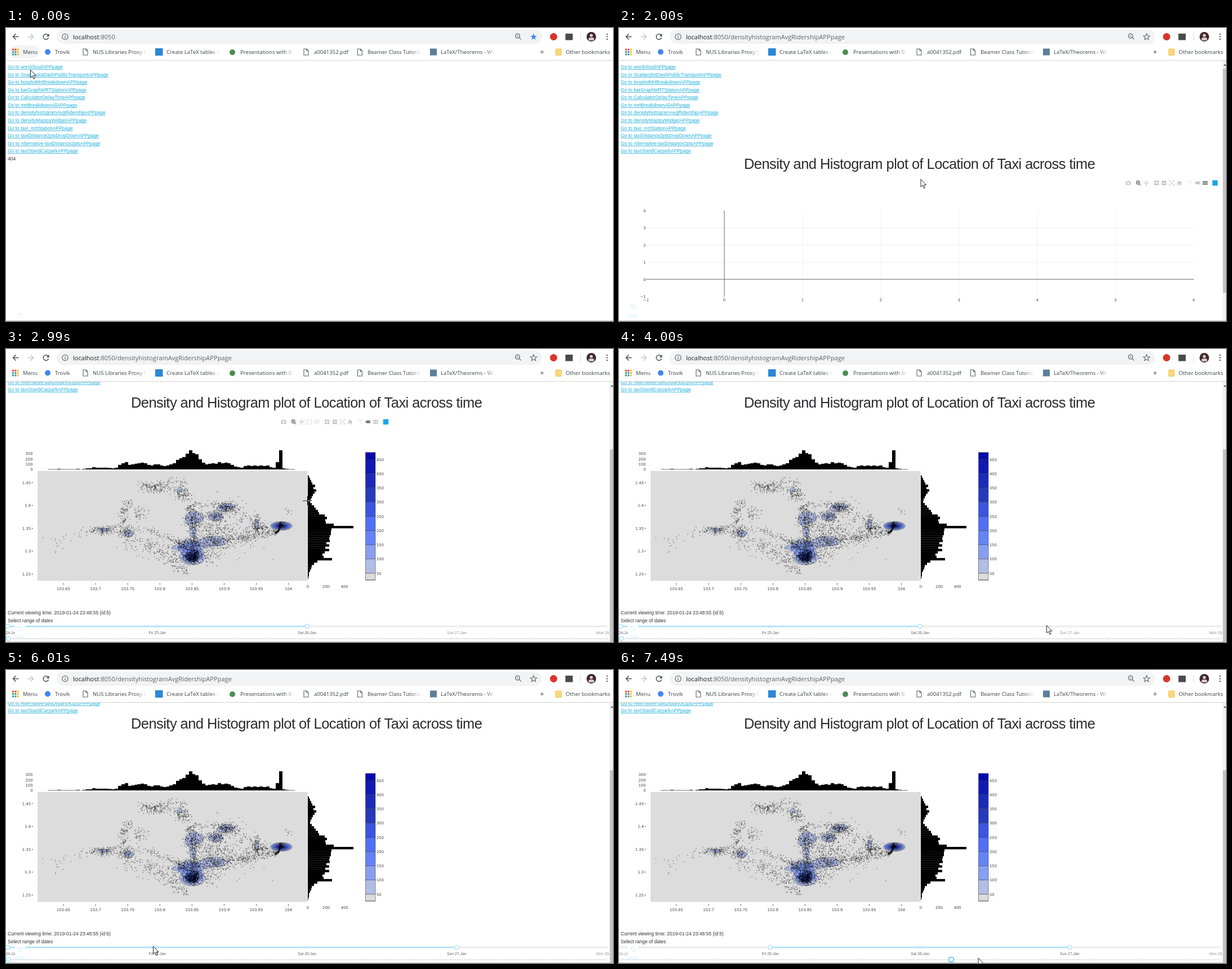
Animation, 1078 px wide and 520 px high, one loop 7990 ms. Source, as an HTML page with a canvas:

```html
<!DOCTYPE html>
<html lang="en">
<head>
<meta charset="utf-8">
<title>Taxi density dashboard</title>
<style>
html, body { margin: 0; width: 100%; height: 100%; overflow: hidden; background: #fff; }
canvas { display: block; width: 1078px; height: 520px; }
</style>
</head>
<body>
<canvas id="stage" width="1078" height="520"></canvas>
<script>
const ctx = document.getElementById('stage').getContext('2d');
const LOOP = 7990;
const UI = '"Open Sans", sans-serif';
const ARIAL = '"Liberation Sans", Arial, sans-serif';
const PLOT = '"DejaVu Sans", Verdana, sans-serif';

// start time, cursor kind, cursor x, cursor y, page changes
const steps = [
  [0, 'arrow', 43.5, 74.5, { page: 'home', menuLit: true }],
  [500, 'hand', 97, 134, { menuLit: false }],
  [990, 'hand', 19, 146, {}],
  [2000, 'arrow', 536, 268.5, { page: 'empty', scroll: 0, thumb: [72, 470] }],
  [2500, 'resize', 536, 269, { page: 'plot', scroll: 85, thumb: [133, 477] }],
  [2990, 'cross', 535, 269, { scroll: 146, thumb: [178, 520] }],
  [3490, 'arrow', 617, 493.5, { bar: false }],
  [4000, 'arrow', 759.5, 490.5, {}],
  [4490, 'arrow', 807.5, 490.5, { to: 3 }],
  [4990, 'arrow', 369.5, 490, { gap: 42.56 }],
  [5510, 'arrow', 264.5, 495, {}],
  [6010, 'arrow', 261.5, 490.5, {}],
  [6490, 'arrow', 264.5, 492.5, { from: 1 }],
  [6990, 'arrow', 598, 509, { gap: 83.7 }],
  [7490, 'arrow', 638, 511, { value: 7 }]
];
const initial = { scroll: 0, bar: true, from: 0, to: 2, gap: 66.5, value: 0 };

const links = ['wordcloud', 'ScatterplotDashPublicTransport', 'boxplotMrtBreakdown', 'barGraphMRTStation',
  'CalculatorDelayTime', 'mrtBreakdownAll', 'densityhistogramAvgRidership', 'densityMapIpyWidget',
  'taxi_mrtStation', 'taxiDistance2ptsDropDown', 'Alternative-taxiDistance2pts', 'taxiStandCarpark'];

function text(s, x, y, size, font, color, align = 'left') {
  ctx.font = `${size}px ${font}`;
  ctx.textAlign = align;
  ctx.fillStyle = color;
  ctx.fillText(s, x, y);
}
function rect(x, y, w, h, color) {
  ctx.fillStyle = color;
  ctx.fillRect(x, y, w, h);
}
function disc(x, y, r, fill, stroke, width = 1) {
  ctx.beginPath();
  ctx.arc(x, y, r, 0, 7);
  paint(fill, stroke, width);
}
function pill(x, y, w, h, r, fill, stroke, width = 1) {
  ctx.beginPath();
  ctx.roundRect(x, y, w, h, r);
  paint(fill, stroke, width);
}
function paint(fill, stroke, width = 1) {
  if (fill) { ctx.fillStyle = fill; ctx.fill(); }
  if (stroke) { ctx.strokeStyle = stroke; ctx.lineWidth = width; ctx.stroke(); }
}
// path in local coordinates around x, y
function shape(d, x, y, fill, stroke, width = 1) {
  ctx.save();
  ctx.translate(x, y);
  const path = new Path2D(d);
  if (fill) { ctx.fillStyle = fill; ctx.fill(path); }
  if (stroke) { ctx.strokeStyle = stroke; ctx.lineWidth = width; ctx.stroke(path); }
  ctx.restore();
}

/* ---------- browser frame ---------- */
function bookmark(label, x, width = 95) {
  const fade = ctx.createLinearGradient(x, 0, x + width, 0);
  fade.addColorStop(0.82, '#3c4043');
  fade.addColorStop(1, 'rgba(60,64,67,0)');
  text(label, x, 46, 9.6, UI, fade);
}
function browser(s) {
  rect(0, 0, 1078, 57, '#fff');
  rect(0, 57, 1078, 1, '#d2d2d2');
  const dark = '#5f6368';
  shape('M5.5 0H-4.5M.5 -5L-4.5 0L.5 5', 17, 15.5, null, '#4d5156', 1.5);
  shape('M-5.5 0H4.5M-.5 -5L4.5 0L-.5 5', 44, 15.5, null, '#c4c6c8', 1.5);
  shape('M4.2 -2.4A4.8 4.8 0 1 0 4.6 1.6', 71, 15.5, null, '#4d5156', 1.5);
  shape('M5.6 -5.6V-.6H.6Z', 71, 15.5, '#4d5156');

  pill(90, 3, 862, 25, 12.5, '#f1f3f4');
  disc(105, 15.5, 5.2, null, dark, 1.1);
  rect(104.4, 14.6, 1.2, 4, dark);
  rect(104.4, 12.2, 1.2, 1.3, dark);
  text('localhost', 119, 19.5, 11.1, UI, '#202124');
  const tail = s.page === 'home' ? ':8050' : ':8050/densityhistogramAvgRidershipAPPpage';
  text(tail, 119 + ctx.measureText('localhost').width, 19.5, 11.1, UI, dark);
  disc(908.5, 14, 3.8, null, dark, 1.3);
  shape('M2.6 2.6L6.3 6.3M-1.7 0H1.7', 908.5, 14, null, dark, 1.2);
  let star = '';
  for (let i = 0; i < 10; i++) {
    const r = i % 2 ? 2.6 : 6, a = i * Math.PI / 5;
    star += (i ? 'L' : 'M') + (r * Math.sin(a)).toFixed(2) + ' ' + (-r * Math.cos(a)).toFixed(2);
  }
  if (s.page === 'home') shape(star + 'Z', 937, 15.8, '#4285f4');
  else shape(star + 'Z', 937, 15.8, null, dark, 1.1);
  disc(972.5, 15.5, 6.5, '#d9362b');
  rect(993.5, 10, 13, 11.5, '#4a4a4a');
  rect(1020, 8, 1, 15, '#dadce0');
  disc(1039.5, 15.5, 8.5, '#40282c');
  ctx.save();
  ctx.beginPath();
  ctx.arc(1039.5, 15.5, 8.5, 0, 7);
  ctx.clip();
  disc(1039.5, 13.2, 2.7, '#d8cccb');
  pill(1034.5, 17, 10, 5, 2.5, '#d8cccb');
  ctx.restore();
  for (const y of [11, 15.5, 20]) disc(1067.5, y, 1.3, dark);

  if (s.menuLit) pill(6, 31, 52, 23, 11.5, '#f1f3f4');
  const dots = ['#ea4335', '#ea4335', '#fbbc05', '#34a853', '#4285f4', '#fbbc05', '#34a853', '#4285f4', '#fbbc05'];
  dots.forEach((c, i) => rect(11 + i % 3 * 4.3, 36.8 + Math.floor(i / 3) * 4.3, 3, 3, c));
  text('Menu', 30, 46, 9.6, UI, '#3c4043');
  disc(74, 42.5, 5, '#4285f4');
  text('Trovik', 87, 46, 9.6, UI, '#3c4043');
  for (const x of [141, 533, 628.5]) {
    shape('M-4 -5.5H1L4 -2.5V5.5H-4ZM1 -5.5V-2.5H4', x, 42.5, '#fff', dark, 1.1);
  }
  bookmark('NUS Libraries Proxy Bo', 154);
  rect(265, 36, 13.5, 13, '#2a86d8');
  bookmark('Create LaTeX tables onl', 285);
  disc(402, 43, 5, '#4b8d54');
  bookmark('Presentations with Bea', 416);
  text('a0041352.pdf', 547, 46, 9.6, UI, '#3c4043');
  bookmark('Beamer Class Tutorial', 642);
  rect(753, 36.5, 12, 12, '#5b7f99');
  bookmark('LaTeX/Theorems - Wi', 772, 97);
  text('»', 949, 46, 12, UI, '#3c4043');
  pill(976, 37, 10.5, 11.5, 1, '#fbd878', '#e9c15c', 0.8);
  text('Other bookmarks', 994, 46, 9.6, UI, '#3c4043');
}

/* ---------- chart toolbar ---------- */
const icons = {
  camera: 'M-4.5 -2.6H-2L-1 -4H1L2 -2.6H4.5V3.6H-4.5ZM2 .4A2 2 0 1 0 -2 .4A2 2 0 1 0 2 .4Z',
  plus: 'M-4 -4H4V4H-4ZM-.7 -2.6V-.7H-2.6V.7H-.7V2.6H.7V.7H2.6V-.7H.7V-2.6Z',
  minus: 'M-4 -4H4V4H-4ZM-2.6 -.7V.7H2.6V-.7Z',
  home: 'M0 -4L4.5 .2H3.2V4H.9V1.2H-.9V4H-3.2V.2H-4.5Z',
  closest: 'M-4.5 0L-2 -2.5H4.5V2.5H-2Z',
  compare: 'M-4.5 -3.2H4.5V-.6H-4.5ZM-4.5 .6H4.5V3.2H-4.5Z'
};
const lineIcons = {
  pan: 'M-4.3 0H4.3M0 -4.3V4.3M-1.3 -3L0 -4.4L1.3 -3M-1.3 3L0 4.4L1.3 3M-3 -1.3L-4.4 0L-3 1.3M3 -1.3L4.4 0L3 1.3',
  zoom: 'M1.1 1.1L4.2 4.2M2.2 -.8A3 3 0 1 0 -3.8 -.8A3 3 0 1 0 2.2 -.8M-2.2 -.8H.6M-.8 -2.2V.6',
  lasso: 'M-3 2.4C-6 -1 -1 -4.5 2.5 -3S4 2.5 -2 2.2M-2 2.2L-3.2 4',
  auto: 'M-2.6 -2.6L2.6 2.6M2.6 -2.6L-2.6 2.6M-4.3 -2V-4.3H-2M2 -4.3H4.3V-2M4.3 2V4.3H2M-2 4.3H-4.3V2',
  spike: 'M-3.5 -2.8H-1.5M-.3 -2.8H1.2M2.8 -4V-1.5M2.8 0V1M2.8 2V3'
};
function toolbar(y, names, xs, active) {
  names.split(' ').forEach((name, i) => {
    const color = active.includes(name) ? '#7c7c7c' : '#c7c7c7';
    if (name === 'logo') rect(xs[i] - 4.7, y - 4.7, 9.4, 9.4, '#1aa5e8');
    else if (name === 'select') {
      ctx.setLineDash([1.5, 1]);
      shape('M-4 -4H4V4H-4Z', xs[i], y, null, color, 1);
      ctx.setLineDash([]);
    } else if (icons[name]) {
      ctx.save();
      ctx.translate(xs[i], y);
      ctx.fillStyle = color;
      ctx.fill(new Path2D(icons[name]), 'evenodd');
      ctx.restore();
    } else shape(lineIcons[name], xs[i], y, null, color, name === 'zoom' ? 1.4 : 1);
  });
}

/* ---------- empty chart ---------- */
function emptyChart() {
  toolbar(275, 'camera zoom pan plus minus auto home spike closest compare logo',
    [904.5, 922.5, 936.5, 954.5, 968, 981.5, 995.5, 1012.5, 1027, 1041, 1058.5], ['zoom', 'compare']);
  for (let i = 1; i < 6; i++) rect(187 + 139 * i - 0.5, 324, 1, 153, '#f1f1f1');
  for (let i = 1; i < 4; i++) rect(48, 446 - 30.5 * i, 973, 1, '#f1f1f1');
  rect(48, 445.6, 973, 0.9, '#555');
  rect(186.6, 324, 0.9, 153, '#555');
  const label = n => String(n).replace('-', '−');
  for (let n = -1; n < 5; n++) text(label(n), 47.5, 448.5 - 30.5 * n, 6.8, PLOT, '#444', 'right');
  for (let n = -1; n < 7; n++) text(label(n), 187 + 139 * n, 484.5, 6.8, PLOT, '#444', 'center');
}

/* ---------- density chart, laid out for a scroll of 85 ---------- */
const topBars = [.5, .5, .5, 1, .5, .5, .5, .5, .5, 1, .2, 1, 2, 2, 4, 3, 3, 3, 3, 2.5, 2, 3, 8, 11, 13, 8, 9, 10, 11, 12,
  11, 8, 7, 9, 9, 7, 6, 7, 9, 11, 17, 20, 22, 28, 34, 29, 27, 18, 12, 9, 10, 11, 10, 13, 11, 12, 11, 8, 5, 4, 3, 6, 7, 6,
  7, 6, 7, 6, 7, 4, 3, 13, 34, 2, 1, .5, .5];
const sideBars = [2, 4, 6, 8, 13, 10, 15, 12, 9, 7, 5, 4, 7, 11, 14, 18, 20, 30, 34, 31, 32, 46, 81, 42, 41, 41, 39, 38,
  39, 33, 38, 31, 38, 30, 26, 28, 43, 17, 11, 7, 6, 4, 2, 2, 1];

const ramp = [[0, 220, 220, 220], [.3, 106, 137, 247], [.4, 90, 120, 245], [.5, 70, 100, 245], [.65, 40, 60, 190], [1, 5, 10, 172]];
function levelColor(level) {
  const v = level / 9;
  const i = Math.max(1, ramp.findIndex(stop => stop[0] >= v));
  const a = ramp[i - 1], b = ramp[i], k = (v - a[0]) / (b[0] - a[0]);
  return `rgb(${[1, 2, 3].map(c => Math.round(a[c] + (b[c] - a[c]) * k))})`;
}

let seed = 20190124;
function random() {
  seed = (Math.imul(seed, 1664525) + 1013904223) >>> 0;
  return seed / 4294967296;
}
const normal = () => (random() + random() + random() + random() - 2) * 1.73;
const points = [];
function cluster(x, y, sx, sy, n) {
  while (n--) points.push([x + normal() * sx, y + normal() * sy]);
}
function trail(n, spread, ...p) {
  for (let i = 0; i < n; i++) {
    const u = random() * (p.length / 2 - 1), k = Math.floor(u) * 2, f = u % 1;
    points.push([p[k] + (p[k + 2] - p[k]) * f + normal() * spread, p[k + 1] + (p[k + 3] - p[k + 1]) * f + normal() * spread]);
  }
}
cluster(267, 307, 15, 5, 140);
cluster(314, 316, 7, 7, 120);
trail(60, 2.5, 236, 302, 265, 304, 296, 292, 322, 298);
trail(70, 4, 219, 330, 212, 345, 203, 357);
cluster(237, 353, 7, 6, 50);
cluster(170, 383, 13, 3.5, 130);
trail(24, 8, 78, 415, 100, 392, 145, 390);
cluster(214, 387, 7, 6, 130);
trail(50, 2, 170, 383, 205, 372, 214, 360);
trail(110, 3, 225, 378, 262, 385, 300, 400, 320, 410);
trail(130, 6, 208, 402, 250, 418, 290, 428, 320, 437);
trail(60, 4, 285, 436, 308, 450, 322, 460);
trail(70, 6, 235, 400, 265, 412, 300, 415);
cluster(333, 362, 8, 8, 220);
cluster(372, 358, 9, 5, 150);
cluster(390, 342, 10, 4, 190);
cluster(333, 387, 4, 13, 140);
cluster(370, 382, 20, 9, 160);
trail(90, 3, 322, 345, 340, 336, 400, 336);
trail(60, 5, 397, 342, 420, 356, 450, 370);
trail(130, 3, 380, 403, 420, 394, 465, 388, 481, 386);
trail(90, 5, 385, 410, 415, 398, 440, 378, 470, 374);
cluster(445, 374, 4, 11, 90);
cluster(457, 381, 9, 7, 60);
cluster(430, 396, 15, 6, 60);
cluster(369, 404, 12, 6, 240);
cluster(326, 408, 13, 5, 240);
cluster(331, 430, 8, 6, 480);
cluster(350, 425, 16, 9, 120);
trail(120, 1.5, 303, 412, 340, 420, 333, 436);
trail(110, .8, 479, 388, 485, 382, 488, 370);
cluster(488, 374, 2.5, 2.5, 70);
cluster(498, 350, 6, 3, 9);
cluster(390, 378, 36, 25, 140);

// closed curve through the midpoints of a coarse outline
function blob(level, ...p) {
  const n = p.length / 2, at = i => [p[i % n * 2], p[i % n * 2 + 1]];
  ctx.beginPath();
  for (let i = 0; i <= n; i++) {
    const [x, y] = at(i), [nx, ny] = at(i + 1);
    if (i) ctx.quadraticCurveTo(x, y, (x + nx) / 2, (y + ny) / 2);
    else ctx.moveTo((x + nx) / 2, (y + ny) / 2);
  }
  paint(levelColor(level), '#555', 0.5);
}
function oval(level, x, y, rx, ry, tilt = 0) {
  ctx.beginPath();
  ctx.ellipse(x, y, rx, ry, tilt, 0, 7);
  paint(levelColor(level), '#555', 0.5);
}
function contours() {
  blob(1, 317, 362, 323, 351, 336, 347, 353, 357, 349, 367, 337, 370, 330, 376, 320, 373);
  oval(1, 372, 358.5, 13, 7.5);
  oval(1, 390, 342, 16, 6.5, -.15);
  oval(1, 332, 386, 5.5, 10);
  oval(1, 218, 388, 9, 6);
  oval(1, 445, 373, 3.5, 10);
  oval(1, 309, 311, 5, 4);
  oval(1, 172, 382, 11, 3);
  blob(1, 288, 415, 310, 405, 324, 396, 338, 403, 353, 396, 374, 392, 392, 399, 389, 409, 372, 411, 353, 412, 347, 421,
    357, 430, 348, 440, 331, 445, 314, 441, 307, 428, 313, 419);
  blob(2, 300, 413, 325, 404, 345, 403, 345, 418, 351, 430, 334, 441, 315, 438, 314, 422);
  oval(3, 331, 427, 13, 11);
  oval(4, 330, 429, 10, 8);
  oval(5, 330, 430, 6.5, 5.5);
  for (let i = 1; i <= 9; i++) oval(i, 489, 375, 21.5 - i * 1.9, 8.6 - i * .75);
}
function densityChart(showBar) {
  if (showBar) toolbar(190.3, 'camera zoom pan select lasso plus minus auto home spike closest compare logo',
    [493, 511, 525, 538.5, 552, 570, 584, 597.5, 611, 628, 642.5, 656.5, 674.5], ['zoom', 'closest']);
  rect(56, 277.5, 479.5, 195, '#dcdcdc');
  contours();
  ctx.fillStyle = 'rgba(0,0,0,.42)';
  for (const [x, y] of points) ctx.fillRect(x - .75, y - .75, 1.5, 1.5);
  topBars.forEach((h, i) => rect(Math.round(73.5 + i * 5.71), 274.7 - h, 6, h, '#000'));
  sideBars.forEach((w, i) => rect(536, 285.4 + i * 4.07, w, 4.3, '#000'));

  const label = (s, x, y, align) => text(s, x, y + 2.5, 6.8, PLOT, '#444', align);
  for (let i = 0; i < 4; i++) label(i * 100, 47.5, 274.8 - i * 9.35, 'right');
  for (let i = 0; i < 5; i++) {
    const y = 298 + i * 40.6;
    label(String(+(1.45 - i * .05).toFixed(2)), 44, y, 'right');
    rect(45.5, y - .5, 2.5, 1, '#555');
  }
  for (let i = 0; i < 8; i++) {
    const x = 102 + i * 57.1;
    label(String(+(103.65 + i * .05).toFixed(2)), x, 486, 'center');
    rect(x - .5, 476.5, 1, 3, '#555');
  }
  for (let i = 0; i < 3; i++) label(i * 200, 536 + i * 32.6, 482, 'center');
  for (let i = 0; i < 10; i++) {
    const top = i === 9 ? 244.7 : 459 - i * 25.25, bottom = i ? 459 - (i - 1) * 25.25 : 471;
    rect(638.5, top, 17.5, bottom - top, levelColor(i));
    rect(638.5, bottom - .3, 17.5, .6, '#333');
    if (i) label(i * 50, 658, bottom);
  }
  ctx.strokeStyle = '#444';
  ctx.lineWidth = .6;
  ctx.strokeRect(638.5, 244.7, 17.5, 226.3);
}

/* ---------- sliders ---------- */
const BLUE = '#96dbfa', RAIL = '#e9e9e9', INK = '#323232';
function dot(x, y, color) { disc(x, y, 1.9, '#fff', color, 1.1); }
function sliders(s) {
  text('Current viewing time: 2019-01-24 23:48:55 (id:5)', 3, 471, 8.5, ARIAL, INK);
  text('Select range of dates', 3, 484.5, 8.5, ARIAL, INK);
  const at = i => 3 + i * 265.8;
  pill(0, 491, 1069, 2.4, 1.2, RAIL);
  rect(at(s.from), 491, at(s.to) - at(s.from), 2.4, '#abe2fb');
  ['Thu 24-Jan', 'Fri 25-Jan', 'Sat 26-Jan', 'Sun 27-Jan', 'Mon 28-Jan'].forEach((day, i) => {
    const on = i >= s.from && i <= s.to;
    dot(at(i), 492.2, on ? BLUE : RAIL);
    text(day, at(i), 506, 6.8, ARIAL, on ? '#666' : '#999', 'center');
  });
  for (const i of [s.from, s.to]) disc(at(i), 492.2, 3.7, '#fff', BLUE, 1.2);
  rect(15.5, 488, 18.5, 22, '#fff');

  pill(2, 513, 1066, 2.2, 1.1, RAIL);
  for (let x = 4; x < 1040; x += s.gap) dot(x, 514, RAIL);
  dot(1067, 514, RAIL);
  if (s.value) pill(586, 509.8, 8, 8, 2, '#fff', '#6fc6f5', 1.8);
  else disc(4.3, 514, 3.7, '#fff', BLUE, 1.2);
}

/* ---------- page ---------- */
function undo(home) {
  const y = home ? 509.5 : 495.5, color = home ? '#e0ecec' : '#d2effb';
  shape('M-3 -1.5A3.4 3.4 0 1 1 -1.5 3.2M-3.6 -3.8V-1H-.8', 25, y, null, color, 1.1);
  if (!home) text('undo', 25, 513.5, 8.5, ARIAL, color, 'center');
}
function page(s) {
  ctx.save();
  ctx.translate(0, -s.scroll);
  links.forEach((name, i) => {
    const label = `Go to ${name}APPpage`, y = 72 + i * 13.58;
    text(label, 3, y, 8.5, ARIAL, '#1eaedb');
    rect(3, Math.round(y + 1), ctx.measureText(label).width, .8, '#1eaedb');
  });
  if (s.page === 'home') text('404', 3, 235, 8.5, ARIAL, INK);
  else {
    ctx.letterSpacing = '-0.567px';
    text('Density and Histogram plot of Location of Taxi across time', 222, 249.5, 25.5, ARIAL, '#2b2b30');
    ctx.letterSpacing = '0px';
  }
  if (s.page === 'empty') emptyChart();
  if (s.page === 'plot') {
    ctx.translate(0, 85);
    densityChart(s.bar);
  }
  ctx.restore();
  if (s.scroll > 100) sliders(s);
  undo(s.page === 'home');
  if (s.thumb) {
    rect(1072, 58, 6, 462, '#f1f1f1');
    rect(1072.5, s.thumb[0], 5.5, s.thumb[1] - s.thumb[0], '#c1c1c1');
    shape('M-2.5 1.5L0 -1.5L2.5 1.5Z', 1076, 65.5, '#505050');
  }
  rect(0, 519, 1078, 1, '#c9c9c9');
}

/* ---------- pointer ---------- */
function pointer(kind, x, y) {
  if (kind === 'arrow') shape('M0 0V13.5L3.2 10.6L5.4 16L7.6 15L5.4 9.9H9.6Z', x, y, '#fff', '#111', .9);
  if (kind === 'hand') {
    shape('M5 1.5Q6.5 0 7.8 1.5V8Q9.5 7 10.6 8.4Q12.4 7.6 13.3 9.2Q15.6 8.6 16 10.6V15Q16 18 14 21.5H6.5Q5 18 1 13Q.8 10.6 3 11.4L5 13.5Z',
      x, y, '#fff', '#111', 1);
  }
  if (kind === 'resize') {
    const d = 'M-5 -5L5 5M-6.5 -2V-6.5H-2M6.5 2V6.5H2';
    shape(d, x, y, null, '#222', 3);
    shape(d, x, y, null, '#fff', 1.3);
  }
  if (kind === 'cross') {
    ctx.globalCompositeOperation = 'difference';
    rect(x - 8, y, 16, 1, '#fff');
    rect(x, y - 8, 1, 8, '#fff');
    rect(x, y + 1, 1, 7, '#fff');
    ctx.globalCompositeOperation = 'source-over';
  }
}

function draw() {
  const t = performance.now() % LOOP;
  const past = steps.filter(step => step[0] <= t);
  const state = Object.assign({}, initial, ...past.map(step => step[4]));
  const [, kind, x, y] = past[past.length - 1];
  rect(0, 0, 1078, 520, '#fff');
  page(state);
  browser(state);
  pointer(kind, x, y);
  requestAnimationFrame(draw);
}
draw();
</script>
</body>
</html>
```
